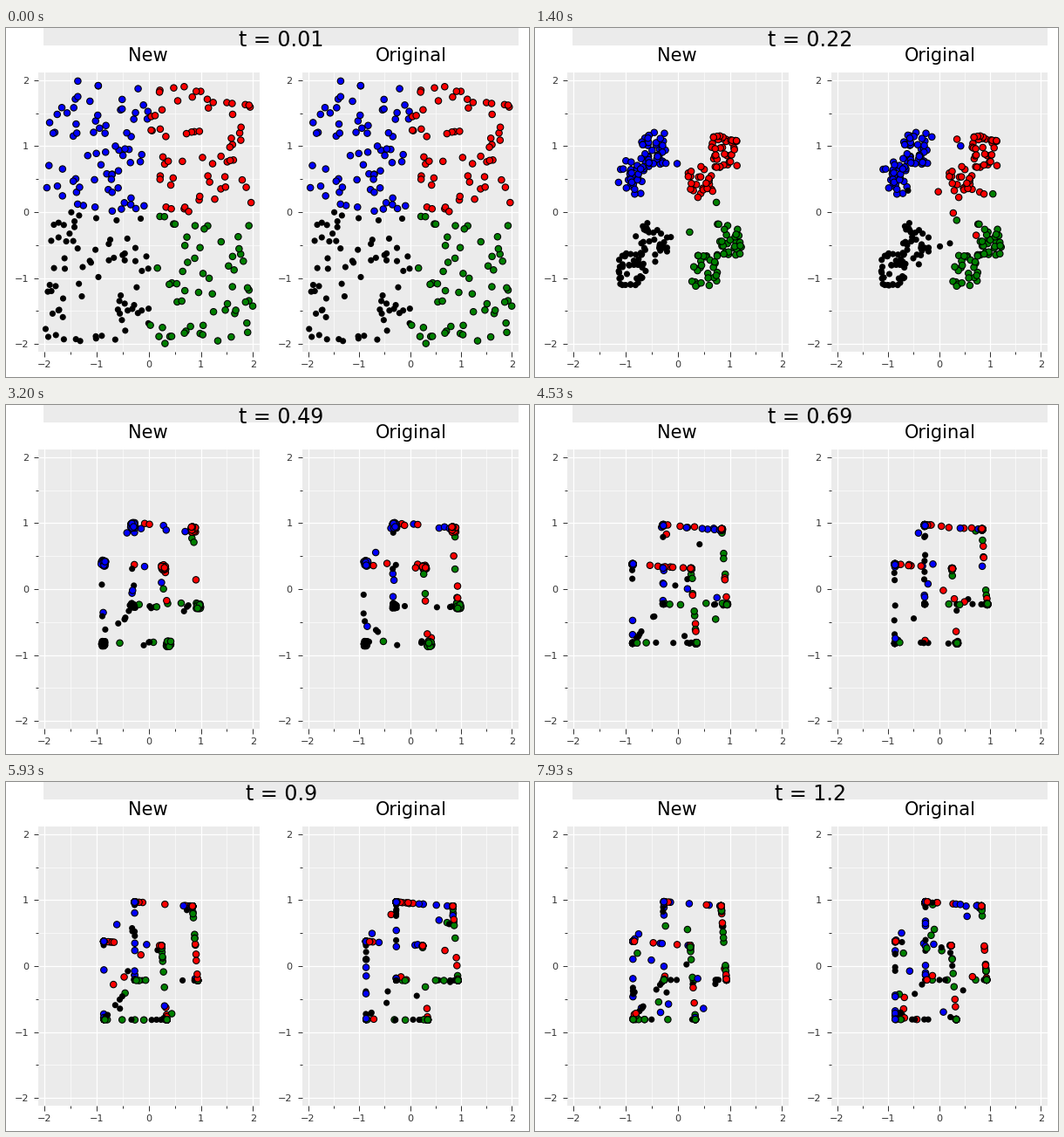
A matplotlib script for the animation above (8 s loop, 600 px wide and 400 px high).

```python
import numpy as np
import matplotlib.pyplot as plt
from matplotlib.animation import FuncAnimation
from matplotlib.patches import Rectangle
from matplotlib.ticker import MultipleLocator

W, H, DPI = 600, 400, 100
PX = 72 / DPI
STEPS, LOOP_MS = 120, 8000
FRAMES = 2 * STEPS
COUNT, DT, DECAY = 270, 0.01, 6.5
PANEL, INK = "#ebebeb", "#333333"
plt.rcParams["font.family"] = "DejaVu Sans"


def attractor(bits, t):
    """Rest point of each switch state: the corners of a skewed cube."""
    a, b, c = bits.T
    x = -0.87 + 0.01 * t + (1.23 - 0.03 * t) * a + 0.595 * c - 0.1 * a * b
    y = -0.825 + 0.015 * t + 1.185 * b + 0.6 * c - 0.065 * a * b
    return np.column_stack([x, y])


def simulate(start, start_bits, seed):
    """Particles relax to their attractor and now and then flip one switch."""
    rng = np.random.default_rng(seed)
    pos, bits = start.copy(), start_bits.copy()
    pull = 1 - np.exp(-DECAY * DT)
    path = [pos.copy()]
    for i in range(1, STEPS):
        t = DT * (i + 1)
        chosen = rng.integers(0, 3, COUNT)
        rate = 0.3 + 0.8 * t
        # the third switch is mostly locked while another one is on
        locked = (chosen == 2) & bits[:, :2].any(axis=1)
        rate = np.where(locked, 0.15 * rate, rate)
        idx = np.flatnonzero(rng.random(COUNT) < rate * DT)
        bits[idx, chosen[idx]] ^= 1
        pos += pull * (attractor(bits, t) - pos)
        path.append(pos.copy())
    return path


def label(x, base, text, size):
    return fig.text(x / W, 1 - base / H, text, fontsize=size * PX,
                    color="black", ha="center", va="baseline")


def make_panel(left, right, title, title_x):
    ax = fig.add_axes([left / W, 1 - 371 / H, (right - left) / W, 320 / H],
                      facecolor=PANEL)
    ax.set(xlim=(-2.12, 2.12), ylim=(-2.116, 2.116))
    ax.spines[:].set_visible(False)
    ax.set_axisbelow(True)
    for axis in (ax.xaxis, ax.yaxis):
        axis.set_major_locator(MultipleLocator(1))
        axis.set_minor_locator(MultipleLocator(0.5))
    ax.grid(which="major", color="white", lw=1.3 * PX)
    ax.grid(which="minor", color="white", lw=0.6 * PX)
    ax.tick_params(which="major", length=5.5 * PX, width=PX, color=INK,
                   labelcolor=INK, labelsize=11.3 * PX, pad=5.5 * PX)
    ax.tick_params(axis="x", which="major", pad=4.5 * PX)
    ax.tick_params(which="minor", length=3 * PX, width=PX, color=INK)
    label(title_x, 38.5, title, 21)
    return ax


fig = plt.figure(figsize=(W / DPI, H / DPI), dpi=DPI, facecolor="white")
fig.add_artist(Rectangle((43 / W, 1 - 20 / H), 545 / W, 20 / H,
                         transform=fig.transFigure, color=PANEL, lw=0,
                         zorder=-1))
clock = label(316, 21, "", 23.8)

rng = np.random.default_rng(11)
start = rng.uniform(-2, 2, (COUNT, 2))
bits = np.column_stack([start > 0, rng.random(COUNT) < 0.5]).astype(int)
palette = np.array(["black", "green", "blue", "red"])
colors = palette[bits[:, 0] + 2 * bits[:, 1]]
is_black = colors == "black"
sizes = np.where(is_black, 7.1 * PX, 7.4 * PX) ** 2
edges = np.where(is_black, 0, 1.1 * PX)

panels = []
for left, right, title, title_x, seed in [(37, 290.5, "New", 163, 21),
                                          (339.5, 587.5, "Original", 464.5, 34)]:
    ax = make_panel(left, right, title, title_x)
    dots = ax.scatter(*start.T, s=sizes, c=colors, edgecolors="black",
                      linewidths=edges, zorder=3)
    panels.append((dots, simulate(start, bits, seed)))


def draw(frame):
    i = min((frame + 1) // 2, STEPS - 1)
    clock.set_text(f"t = {round(DT * (i + 1), 2)}")
    for dots, path in panels:
        dots.set_offsets(path[i])
    return [clock] + [dots for dots, _ in panels]


anim = FuncAnimation(fig, draw, frames=FRAMES, interval=LOOP_MS / FRAMES,
                     repeat=True, repeat_delay=0, blit=False)
plt.show()
```
